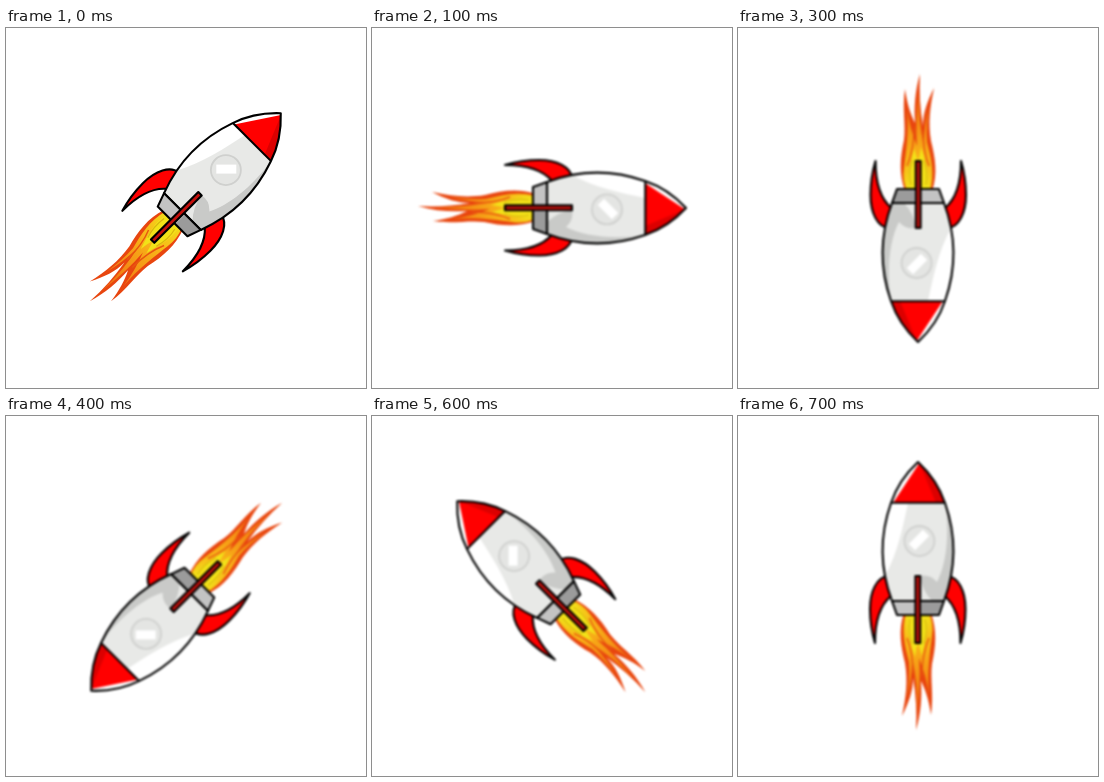
An HTML page that plays this animation: 360x360 px, repeating every 0.8 s.

```html
<!DOCTYPE html>
<html lang="en">
<head>
<meta charset="utf-8">
<title>Spinning rocket</title>
<style>
  html, body { margin: 0; width: 100%; height: 100%; overflow: hidden; background: #fff; }
  svg { display: block; width: 100%; height: 100%; }
  .line { stroke: #000; stroke-width: 2.1; stroke-linejoin: round; }
</style>
</head>
<body>
<svg id="stage" viewBox="0 0 360 360">
  <defs>
    <path id="hull" d="M180 46C194 59 202 72 207 87C219 121 218 153 206 185H154C142 153 141 121 153 87C158 72 166 59 180 46Z"/>
    <clipPath id="inHull"><use href="#hull"/></clipPath>
    <path id="fin" d="M150 160C139 161 132 175 132 193C132 206 134 217 137 227C137 207 141 190 153 180Z"/>
    <linearGradient id="fire" x1="0" y1="199" x2="0" y2="290" gradientUnits="userSpaceOnUse">
      <stop offset="0" stop-color="#f3d91a"/>
      <stop offset=".35" stop-color="#f8b318"/>
      <stop offset="1" stop-color="#f07012"/>
    </linearGradient>
  </defs>
  <g id="rocket">
    <!-- flame -->
    <path fill="#e8460f" d="M166 197C160 214 163 231 167 247C170 265 168 281 164 300C171 286 175 275 175 262C178 279 179 296 178 314C183 297 184 281 183 265C188 275 191 285 193 299C196 279 192 263 194 248C198 230 199 214 193 197Z"/>
    <path fill="url(#fire)" d="M168 197C163 214 167 231 171 246Q172 262 169 281Q174 264 174 242Q180 267 179 297Q183 267 181 242Q188 259 191 279C189 256 192 236 194 220Q196 208 191 197Z"/>
    <path fill="none" stroke="#e8560f" stroke-width="1.4" d="M169 222Q175 236 175 258M191 222Q184 238 184 260"/>
    <path fill="#f2e218" d="M171 197C167 211 172 225 177 241Q178 232 180 226L184 240C186 227 193 212 188 197Z"/>
    <path fill="none" stroke="#d9b310" stroke-width="1.2" d="M172 203Q170 216 174 228M187 203Q190 214 186 228"/>

    <g class="line" fill="#f00">
      <use href="#fin"/>
      <use href="#fin" transform="matrix(-1 0 0 1 359.5 0)"/>
    </g>

    <!-- hull and nose -->
    <g clip-path="url(#inHull)">
      <path fill="#e8e9e7" d="M140 40H220V190H140Z"/>
      <path fill="#fff" d="M140 87H170C165 110 160 136 147 160L140 160Z"/>
      <path fill="#c9cac8" d="M207 87C212 119 208 149 199 166Q192 158 182 160Q184 175 195 186H220V87Z"/>
      <path fill="#f00" d="M140 40H220V87H140Z"/>
      <path fill="#dc0000" d="M181 46L198 87H220V46Z"/>
      <path fill="#fff" d="M182 46L155 87H140V46Z"/>
    </g>
    <path d="M153 86.7H207" class="line"/>
    <use href="#hull" class="line" fill="none"/>

    <!-- window -->
    <circle cx="181.4" cy="125" r="15" fill="#e4e5e3" stroke="#cfd0ce" stroke-width="1.8"/>
    <path fill="#fff" d="M-10-4.5H10V4.5H-10Z" transform="translate(181 124) rotate(-45)"/>

    <!-- nozzle -->
    <path fill="#c3c3c3" d="M154 185H206L201 199H159Z"/>
    <path fill="#9b9b9b" d="M184 185H206L201 199H184Z"/>
    <path class="line" fill="none" d="M154 185H206L201 199H159Z"/>

    <path class="line" fill="#c4100c" d="M177.4 160H182.2V227H177.4Z"/>
  </g>
</svg>
<script>
  const stage = document.getElementById("stage");
  const rocket = document.getElementById("rocket");
  const STEP = 100, STEPS = 8;

  function draw(now) {
    const step = Math.floor(now / STEP) % STEPS;
    rocket.setAttribute("transform", `rotate(${45 * (step + 1)} 180 180)`);
    // The turned poses are slightly softer than the first one.
    stage.style.filter = step ? "blur(.8px)" : "none";
  }

  let start;
  function tick(now) {
    start ??= now;
    draw(now - start);
    requestAnimationFrame(tick);
  }
  draw(0);
  requestAnimationFrame(tick);
</script>
</body>
</html>
```
